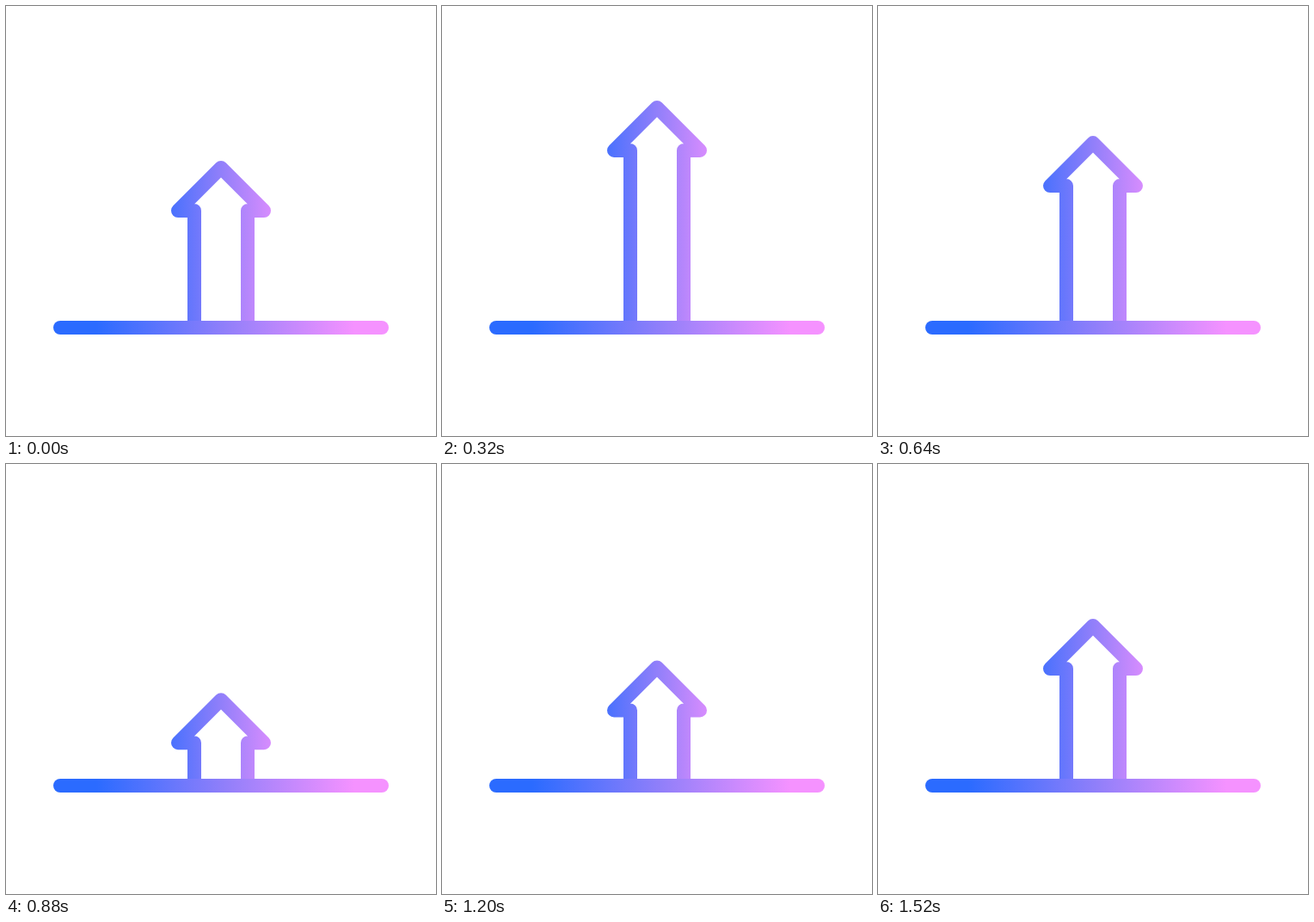
An HTML page with a canvas for the animation above (1.68 s loop, 500 by 500 pixels).

```html
<!DOCTYPE html>
<html lang="en">
<head>
<meta charset="utf-8">
<title>Bouncing arrow</title>
<style>
  html, body { margin: 0; width: 100%; height: 100%; overflow: hidden; background: #fff; }
  canvas { display: block; width: 500px; height: 500px; }
</style>
</head>
<body>
<canvas id="stage" width="500" height="500"></canvas>
<script>
const ctx = document.getElementById('stage').getContext('2d');
const LOOP = 1680;
const STEP = 40;
const BASE_Y = 374;

// Vertical offset of the arrow head: [time in ms, offset in px]
const KEYS = [[0, 0], [460, -90], [920, 90], [1510, 0]];

const ease = x => x * x * (3 - 2 * x);

function headOffset(t) {
  for (let i = 1; i < KEYS.length; i++) {
    const [t0, y0] = KEYS[i - 1];
    const [t1, y1] = KEYS[i];
    if (t < t1) return y0 + (y1 - y0) * ease((t - t0) / (t1 - t0));
  }
  return 0;
}

function blueToPink(x0, x1) {
  const gradient = ctx.createLinearGradient(x0, 0, x1, 0);
  gradient.addColorStop(0, '#2b6bff');
  gradient.addColorStop(0.5, '#917ffa');
  gradient.addColorStop(1, '#f592ff');
  return gradient;
}

const arrowPaint = blueToPink(167, 333);
const basePaint = blueToPink(105, 405);

function strokeLine(points, paint) {
  ctx.strokeStyle = paint;
  ctx.beginPath();
  points.forEach(([x, y]) => ctx.lineTo(x, y));
  ctx.stroke();
}

function draw(t) {
  const tip = 188 + headOffset(t);
  const wing = tip + 50;
  ctx.fillStyle = '#fff';
  ctx.fillRect(0, 0, 500, 500);
  ctx.lineWidth = 16;
  ctx.lineCap = ctx.lineJoin = 'round';
  strokeLine([
    [219, BASE_Y], [219, wing], [200, wing], [250, tip],
    [300, wing], [281, wing], [281, BASE_Y]
  ], arrowPaint);
  strokeLine([[63, BASE_Y], [437, BASE_Y]], basePaint);
}

const start = performance.now();
function tick() {
  const t = (performance.now() - start) % LOOP;
  draw(Math.floor(t / STEP) * STEP);
  requestAnimationFrame(tick);
}
tick();
</script>
</body>
</html>
```
